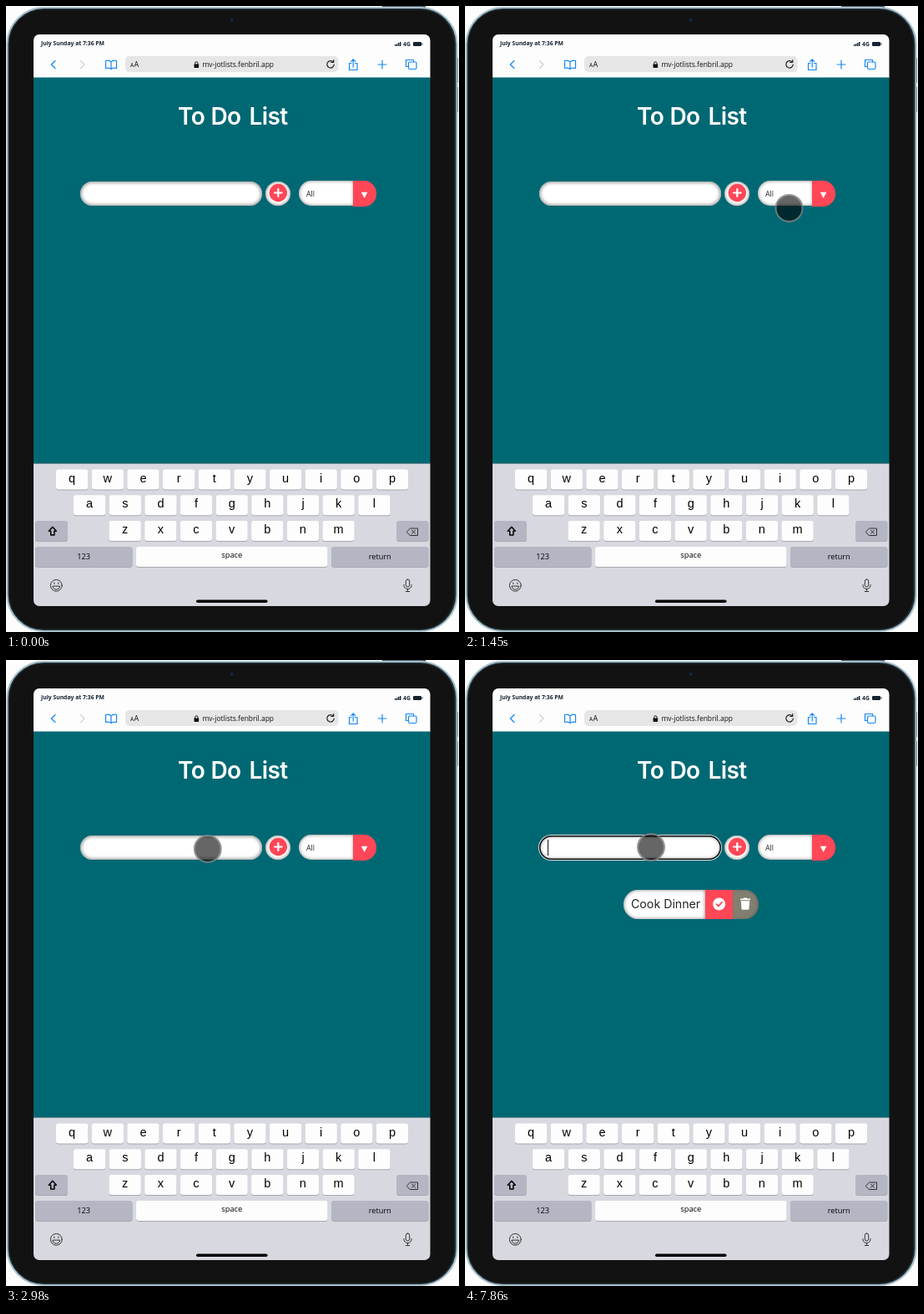
Animation of 543x749 px, one loop 8000 ms. Source, as an HTML page:

```html
<!DOCTYPE html>
<html lang="en">
<head>
<meta charset="utf-8">
<title>To Do List</title>
<style>
  html, body { margin: 0; width: 100%; height: 100%; overflow: hidden; background: #fdfdfd; }
  #stage { position: relative; width: 543px; height: 749px; overflow: hidden; }
  #stage > * { position: absolute; box-sizing: border-box; }
  svg { left: 0; top: 0; }
  .ui { font-family: "Open Sans", "Noto Sans", sans-serif; }
  .arial { font-family: "Liberation Sans", Arial, sans-serif; }
  .brand { font-family: Inter, sans-serif; }
  .line { fill: none; stroke-linecap: round; stroke-linejoin: round; }
  .pill { background: #fff; box-shadow: inset 0 0 4px #777; }
  .red { background: #ff4757; }
  #field { left: 89px; top: 210px; width: 218px; height: 29px; border-radius: 15px; box-shadow: inset 0 0 4px 1px #888; }
  #field.focus { box-shadow: 0 0 0 1px #d5e3e5, inset 0 0 0 1.5px #101010, inset 0 0 4px 1px #888; }
  #add { left: 311px; top: 210px; width: 30px; height: 29px; border-radius: 50%; }
  #filter { left: 351px; top: 209px; width: 66px; height: 30px; border-radius: 15px 0 0 15px; }
  #arrow { left: 416px; top: 209px; width: 28px; height: 31px; border-radius: 0 15px 15px 0; }
  #item { left: 190px; top: 275px; width: 98px; height: 35px; border-radius: 18px 0 0 18px; }
  #done { left: 288px; top: 275px; width: 33px; height: 35px; }
  #trash { left: 321px; top: 275px; width: 31px; height: 35px; border-radius: 0 17px 17px 0;
    background: #827f71; box-shadow: inset -1px 0 3px #5d6258; }
  #typed { left: 98px; top: 215px; height: 19px; line-height: 19px; font-size: 16.7px; white-space: pre; color: #000; }
  #caret { display: inline-block; width: 1px; height: 19px; margin-left: .5px; background: #111; vertical-align: top; }
  #cursor { left: -17px; top: -17px; width: 34px; height: 34px; border-radius: 50%;
    background: rgba(0,0,0,.6); border: 2px solid rgba(190,190,190,.55); }
  #press { position: absolute; left: 3px; top: 3px; width: 24px; height: 24px; border-radius: 50%; background: rgba(0,0,0,.25); }
</style>
</head>
<body>
<div id="stage">
  <svg width="543" height="749">
    <!-- tablet body -->
    <path d="M451 1H503M541 62V92M541 97V127" stroke="#4d5f68" stroke-width="2"/>
    <rect x="1.5" y="2" width="539" height="746" rx="44" fill="#22323b" stroke="#a9c1cc" stroke-width="2"/>
    <rect x="4" y="4.5" width="533.5" height="741" rx="41" fill="#121212"/>
    <circle cx="270.5" cy="17" r="2" fill="#14264a"/>
    <clipPath id="glass"><rect x="33" y="34" width="475.5" height="684" rx="7"/></clipPath>
    <g clip-path="url(#glass)">
      <rect x="33" y="34" width="476" height="52" fill="#fdfdfd"/>
      <rect x="33" y="85.5" width="476" height="462" fill="#006873"/>
      <rect x="33" y="547.5" width="476" height="171" fill="#d8d9e0"/>
    </g>

    <!-- status bar -->
    <g class="ui" font-weight="700" font-size="6.8" fill="#142231">
      <text x="42" y="47">July Sunday at 7:36 PM</text>
      <text x="476" y="48">4G</text>
      <path d="M466 46h1.4v2h-1.4zM468 45.200h1.400v2.800h-1.400zM470 44h1.400v4h-1.400zM472 43h1.400v5h-1.400z"/>
      <rect x="488" y="43" width="10" height="5" rx="1.300"/><rect x="498.500" y="44.500" width="1" height="2"/>
    </g>

    <!-- browser bar -->
    <rect x="143" y="60" width="255.5" height="19" rx="5" fill="#e6e6e7"/>
    <g class="line" stroke="#1687f5" stroke-width="1.2">
      <path d="M59 65.500 54.300 70 59 74.500"/>
      <path d="M89.500 65.500 94 70 89.500 74.500" stroke="#cfd0d3"/>
      <path d="M126 67c-1.500-2-4.500-2-6.500-1.500v9c2-.5 5-.5 6.500 1 1.500-1.500 4.500-1.500 6.500-1v-9c-2-.5-5-.5-6.500 1.500v8.500"/>
      <path d="M414 68.500h-2.500v8h9.500v-8h-2.500M416.200 73V64M413.600 66.400 416.200 63.800 418.800 66.400"/>
      <path d="M446 70H456M451 65V75"/>
      <path d="M482 72.500h-2.500v-8h9v2.500"/><rect x="482.500" y="67" width="9.500" height="8.500" rx="1.500"/>
      <path d="M392.300 67.200a4.200 4.200 0 1 0 .9 3M392.700 64.500v3h-3" stroke="#222"/>
    </g>
    <g class="ui" fill="#111">
      <text x="149" y="73" font-size="6.500">A</text><text x="153.500" y="73" font-size="9">A</text>
      <text x="235.500" y="73" font-size="8.450">mv-jotlists.fenbril.app</text>
      <rect x="225.500" y="69.500" width="5.600" height="4.500" rx=".7"/>
      <path d="M226.600 70v-1.500a1.700 1.700 0 0 1 3.400 0V70" fill="none" stroke="#111"/>
    </g>

    <g class="brand" fill="#fff" font-weight="600" font-size="28" letter-spacing="-.6">
      <text x="206" y="141.500">To</text><text x="245.500" y="141.500">Do</text><text x="291.500" y="141.500">List</text>
    </g>

    <!-- keyboard -->
    <g id="keys" text-anchor="middle"></g>
    <path d="M55.800 623.300 60.300 628.200H57.900V633H53.700V628.200H51.300Z" class="line" stroke="#000" stroke-width="1.500"/>
    <g class="line" stroke="#333" stroke-width="1">
      <path d="M480.500 629 484.500 625H493.500V633.500H484.500ZM486.500 627.200 490.500 631.300M490.500 627.200 486.500 631.300"/>
      <circle cx="60.300" cy="693.300" r="6.900"/>
      <path d="M56 694.500c.6 5 8 5 8.600 0ZM57.800 690v1.500M62.800 690v1.500"/>
      <rect x="479.300" y="686" width="4.400" height="9" rx="2.200"/>
      <path d="M477 692.500v1a4.500 4 0 0 0 9 0v-1M481.500 697.500v3M479.300 700.500h4.400"/>
    </g>
    <rect x="228" y="710.500" width="85.500" height="3.600" rx="1.800" fill="#000"/>
  </svg>

  <div class="pill" id="field"></div>
  <div class="pill" id="add"></div>
  <div class="pill" id="filter"></div>
  <div class="red" id="arrow"></div>
  <svg width="543" height="749">
    <circle cx="326.300" cy="223.500" r="10.700" fill="#ff4757"/>
    <path d="M322 223.500H330.600M326.300 219.200V227.800" class="line" stroke="#fff" stroke-width="2.200"/>
    <path d="M425.800 222.800H433.400L429.600 230Z" fill="#fff"/>
    <text class="ui" x="360" y="228" font-size="8.800" fill="#222">All</text>
  </svg>
  <div id="typed" class="arial"><span id="text"></span><i id="caret"></i></div>

  <div id="todo">
    <div class="pill" id="item"></div>
    <div class="red" id="done"></div>
    <div id="trash"></div>
    <svg width="543" height="749">
      <text class="brand" x="199" y="297" font-size="14.200" fill="#222">Cook Dinner</text>
      <circle cx="304.600" cy="292" r="7.500" fill="#fff"/>
      <path d="M301.300 292.200 303.700 294.600 308 289.900" class="line" stroke="#ff4757" stroke-width="1.700"/>
      <path d="M330 285.500h3.500l1-1h3l1 1h3.500v1.800h-12zM330.800 288.300h10.400l-.7 9.200q-.1 1.300-1.400 1.300h-6.200q-1.300 0-1.400-1.300z" fill="#fff"/>
    </svg>
  </div>

  <div id="cursor"><div id="press"></div></div>
</div>

<script>
const $ = id => document.getElementById(id);
for (const part of $('todo').children) { part.style.position = 'absolute'; part.style.boxSizing = 'border-box'; }
$('todo').style.cssText = 'left:0;top:0';

// Keyboard
const key = (x, y, w, label, {fill = '#fdfdfd', size = 14.5, font = 'arial', base = 15} = {}) => `
  <rect x="${x}" y="${y + 1}" width="${w}" height="24" rx="3" fill="#a6a8b0"/>
  <rect x="${x}" y="${y}" width="${w}" height="24" rx="3" fill="${fill}"/>
  <text class="${font}" x="${x + w / 2}" y="${y + base}" font-size="${size}">${label}</text>`;
const grey = {fill: '#b5b6c3', size: 9.2, font: 'ui', base: 15};
const rows = [['qwertyuiop', 60, 554.5], ['asdfghjkl', 81, 585.3], ['zxcvbnm', 123.5, 616]];
$('keys').innerHTML =
  rows.map(([row, x, y]) => [...row].map((c, i) => key(x + i * 42.65, y, 38.3, c)).join('')).join('') +
  key(35, 616, 39, '', grey) + key(468, 616, 38.5, '', grey) +
  key(35, 647, 116.5, '123', grey) + key(390, 647, 116.5, 'return', grey) +
  key(156, 647, 229.5, 'space', {size: 9.4, font: 'ui', base: 13});

// Timeline
const LOOP = 8000, PRESS = 3220, FOCUS = 3380, SUBMIT = 7860;
const phrase = 'Cook Dinner';
const strokes = [4430, 4780, 4890, 5010, 5270, 5700, 5950, 6130, 6230, 6330, 6530];
const caretOn = [[FOCUS, 3840], [4370, 7060], [7570, LOOP]];
const path = [ // time, x, y
  [30, 512, 622], [520, 330, 330], [820, 168, 217], [1100, 110, 250], [1270, 230, 273],
  [1450, 388, 242], [1640, 456, 224], [1700, 463, 222], [2090, 260, 229], [2160, 245, 232],
  [2460, 315, 236], [2580, 336, 243], [2980, 242, 226], [3070, 223, 224]
];

// Monotone cubic through the path points, so turning points are never overshot
function slope(i, axis) {
  if (i === 0 || i === path.length - 1) return 0;
  const rate = j => (path[j + 1][axis] - path[j][axis]) / (path[j + 1][0] - path[j][0]);
  const a = rate(i - 1), b = rate(i);
  return a * b <= 0 ? 0 : 2 * a * b / (a + b);
}
function along(t, axis) {
  const i = path.findIndex(p => p[0] > t) - 1;
  if (i < 0) return path[path.length - 1][axis];
  const [p, q] = [path[i], path[i + 1]], span = q[0] - p[0], u = (t - p[0]) / span;
  const ease = u * u * (3 - 2 * u);
  return p[axis] + (q[axis] - p[axis]) * ease +
    span * u * (1 - u) * ((1 - u) * slope(i, axis) - u * slope(i + 1, axis));
}

const show = (id, on) => $(id).style.visibility = on ? 'visible' : 'hidden';
function draw(t) {
  const moving = t >= path[0][0];
  show('cursor', moving);
  if (moving) $('cursor').style.transform = `translate(${along(t, 1)}px, ${along(t, 2)}px)`;
  $('press').style.opacity = t >= PRESS && t < FOCUS ? 1 : 0;
  $('field').classList.toggle('focus', t >= FOCUS);
  $('text').textContent = t < SUBMIT ? phrase.slice(0, strokes.filter(s => s <= t).length) : '';
  show('caret', caretOn.some(([from, to]) => t >= from && t < to));
  show('todo', t >= SUBMIT);
}

const start = performance.now();
function tick() {
  draw((performance.now() - start) % LOOP);
  requestAnimationFrame(tick);
}
tick();
</script>
</body>
</html>
```
